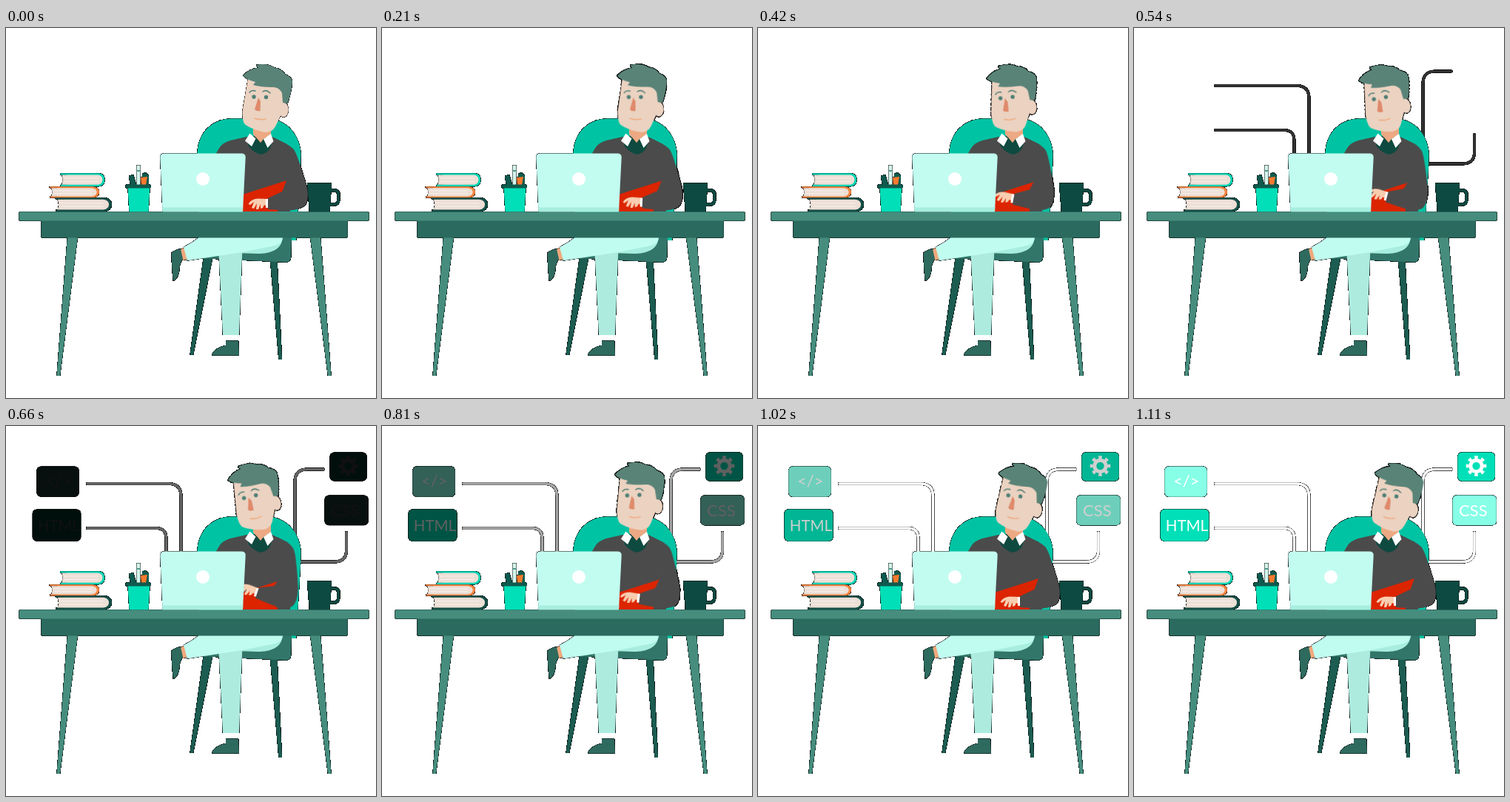
An HTML page that plays this animation: 500 by 500 pixels, repeating every 2.31 s.

```html
<!DOCTYPE html>
<html lang="en">
<head>
<meta charset="utf-8">
<title>Developer at a desk</title>
<style>
  html, body { margin: 0; width: 100%; height: 100%; overflow: hidden; background: #fff; }
  svg { display: block; width: 100vw; height: 100vh; }
  text { font-family: Lato, sans-serif; fill: #fff; }

  .head, .arm, .forearm, .wires, .labels { animation: 2310ms linear infinite; }
  .head { animation-name: head; transform-origin: 345px 146px; }
  .arm { animation-name: arm; transform-origin: 378px 165px; }
  .forearm { animation-name: forearm; transform-origin: 400px 236px; }
  .wires { animation-name: wires; fill: none; stroke: #fff; stroke-width: 3.6; stroke-linecap: round; }
  .labels { animation-name: labels; }

  @keyframes head {
    0%, 6.5% { transform: rotate(0deg); }
    14.29% { transform: rotate(-5deg); }
    23.38% { transform: rotate(-12deg); }
    28.57%, 29.87% { transform: rotate(-15deg); }
    35.06% { transform: rotate(-4deg); }
    40.26% { transform: translateY(1.2px) rotate(3.3deg); }
    45%, 100% { transform: translateY(1.2px) rotate(3.5deg); }
  }
  @keyframes arm {
    0%, 6.5% { transform: rotate(0deg); }
    14.29% { transform: rotate(5deg); }
    23.38% { transform: rotate(10.5deg); }
    28.57%, 29.87% { transform: rotate(13deg); }
    35.06% { transform: rotate(5deg); }
    40.26%, 100% { transform: rotate(0deg); }
  }
  @keyframes forearm {
    0%, 6.5% { transform: rotate(0deg); }
    14.29% { transform: rotate(2.3deg); }
    23.38% { transform: rotate(4.8deg); }
    28.57%, 29.87% { transform: rotate(6deg); }
    35.06% { transform: rotate(2.3deg); }
    40.26%, 100% { transform: rotate(0deg); }
  }
  @keyframes wires {
    0%, 18.18% { opacity: 0; }
    44.16%, 100% { opacity: 1; }
  }
  @keyframes labels {
    0%, 27.27% { opacity: 0; }
    48.05%, 100% { opacity: 1; }
  }
</style>
</head>
<body>
<svg viewBox="0 0 500 500">
  <defs>
    <!-- Puts black behind every partly transparent pixel: dark rims, fades from black -->
    <filter id="matte" filterUnits="userSpaceOnUse" x="0" y="0" width="500" height="500" color-interpolation-filters="sRGB">
      <feComponentTransfer in="SourceAlpha" result="black"><feFuncA type="linear" slope="30"/></feComponentTransfer>
      <feMerge><feMergeNode in="black"/><feMergeNode in="SourceGraphic"/></feMerge>
    </filter>
    <g id="book">
      <path fill="currentColor" d="M1 .3H53Q61 1 61 9T53 18.3H2Q0 17 2 15.500H10V2.500H1Q0 1.500 1 .3Z"/>
      <path fill="#eddfd6" d="M3 2.500H52Q58 3.500 58 9T52 15.800H3Q5 9 3 2.500Z"/>
      <path fill="none" stroke="#fff" stroke-width=".8" opacity=".7" d="M6 7H52M6 11.500H52"/>
    </g>
  </defs>

  <g filter="url(#matte)">
    <g class="wires">
      <path d="M110 78H220Q236.500 78 236.500 95V175M110 138H203Q216.500 138 216.500 152V175"/>
      <path d="M429 58.500H407Q390.500 58.500 390.500 75V160M460 144V168Q460 183.500 444 183.500H390"/>
    </g>

    <g class="labels">
      <rect x="41.300" y="54.400" width="57.500" height="41.400" rx="6" fill="#87ffe7"/>
      <rect x="35.600" y="112.400" width="65.800" height="43.300" rx="6" fill="#00e0b8"/>
      <rect x="437.400" y="35.500" width="50.400" height="39" rx="6" fill="#00e0b8"/>
      <rect x="430.400" y="93.500" width="59.400" height="40.800" rx="6" fill="#87ffe7"/>
      <text x="53" y="82" font-size="22">&lt;/&gt;</text>
      <text x="42.800" y="141.500" font-size="20.500">HTML</text>
      <text x="439" y="122" font-size="22">CSS</text>
      <g fill="none" stroke="#fff" stroke-width="5">
        <circle cx="462.500" cy="54" r="7.700"/>
        <circle cx="462.500" cy="54" r="11.300" pathLength="16" stroke-dasharray="1" stroke-dashoffset=".5"/>
      </g>
    </g>

    <g class="chair">
      <path fill="#00c3a4" d="M258.500 185V168C260 140 280 122.500 305 122.500H352C380 122.500 397 145 398.500 170L398 188L392 287H262Z"/>
      <path fill="#1c5c51" d="M267 309H279.500L253 442H248.500ZM357 314H366.500L373 448H368.500Z"/>
      <path fill="#32766a" d="M262 280H386L385 311Q384 317 377 316.500L262 311Z"/>
    </g>

    <g class="legs">
      <path fill="#aeebdf" d="M287 295L293 415H315L319.500 295Z"/>
      <path fill="#2f6a5f" d="M278 442.500Q280 433 297 429V422.500H314L315 442.500Z"/>
      <path fill="#f0a97c" d="M234 300L241 297L246 312L239 314Z"/>
      <path fill="#2f6a5f" d="M223.500 304Q229 299 236 298.500L239 312Q234 319 234 330Q232 339 226 342Q224 325 223.500 304Z"/>
      <path fill="#a8eee0" d="M300 282H374Q373 304 342 305L310 304Z"/>
      <path fill="#c0fcf0" d="M240 296Q252 290 262 282H374Q374 291 364 294L319 303L245 314.500Z"/>
    </g>

    <g class="body">
      <path fill="#4b4b4b" d="M325 147L303 152Q292 155 287 164L278 180V248H384L385 180L380 157L360 147Z"/>
      <path fill="#dc2400" d="M315 226.500L384 204.500L367 240V248H315Z"/>
      <path fill="#0e4a40" d="M325 150L328 160Q334 168 344 171Q354 169 357 162L361 150L350 146H335Z"/>
      <path fill="#eca983" d="M334 130H358V144L348 150L344 155L339 149L334 144Z"/>
      <path fill="#fff" d="M329.500 142.500L323 152.500L332 160L337.500 149.500ZM358 143L361.500 153L353.500 162L348 150Z"/>
      <g class="arm">
        <g class="forearm">
          <path fill="#f8cdb0" d="M354 231L340 230.500Q331 231 327.500 238L330 239L335 235L332 243L335 244L339 237L338 245H341L344 238V244L347 243L349 239L354 242Z"/>
          <path fill="#fff" d="M351 231H355V243H351Z"/>
          <path fill="#4b4b4b" d="M354 230L373 221L398 222Q408 236 400 242Q391 246.500 380 246.500L354 245Z"/>
        </g>
        <path fill="#4b4b4b" d="M364 153L379 157Q389 161 392.500 171Q399.500 189 406.500 214Q410.500 234 403 241Q394 246 384 246L373 222L379 206L364 178Z"/>
      </g>
    </g>

    <g class="head">
      <path fill="#ebd2c1" d="M327 68L319.500 112Q319 128 324 131Q335 138.500 350 141Q360 141 364 133L371 119L380 78L360 65Z"/>
      <ellipse cx="375" cy="110.500" rx="6.800" ry="10" fill="#ebd2c1"/>
      <path fill="#5a8378" d="M320 64Q329 55 341 53.500Q338 51.500 338 50Q353 47 363 53.500Q373 55 377 62Q386 66 387 72Q386 87 380.500 102L374 101L373 88Q369 79.500 360 80Q344 80 334 77L337 73Q325 70 320 64Z"/>
      <g fill="none" stroke="#4f7f75" stroke-width="1.500" stroke-linecap="round">
        <path d="M329 87Q332 83.500 337 85M347 86Q352 82.500 357 88"/>
      </g>
      <g fill="#4f7f75"><circle cx="335" cy="93" r="2.700"/><circle cx="351.500" cy="93.500" r="2.700"/></g>
      <path fill="#df8a6b" d="M341 94L336 110Q339 113 343.500 112L344 99Z"/>
      <path fill="none" stroke="#efae82" stroke-width="1.500" stroke-linecap="round" d="M336 122Q344 125 351 123"/>
    </g>

    <g class="table">
      <path fill="#468d7e" d="M83 282H97L73 470H68.500ZM411 282H425L439.500 470H435Z"/>
      <rect x="47.500" y="255" width="414.200" height="28.500" rx="2" fill="#2b6a5e"/>
      <rect x="17.500" y="248.300" width="473" height="12.300" rx="2" fill="#468d7e"/>
    </g>

    <g class="laptop">
      <path fill="#c2fcf0" d="M208.300 175Q208 169.500 214 169.500H318Q324 169.500 323.700 175L320 248.300H211.500Z"/>
      <path fill="#a8eee0" d="M211 242.500H320.300L320 248.300H211.500Z"/>
      <circle cx="266" cy="204" r="9" fill="#fff"/>
    </g>

    <g class="books">
      <use href="#book" color="#00d3b2" transform="translate(72.500 196)"/>
      <use href="#book" color="#f5843f" transform="translate(58 214) scale(1.115 .85)"/>
      <use href="#book" color="#134f47" transform="translate(66 229) scale(1.26 1.050)"/>
    </g>

    <g class="pencils">
      <path fill="#0e5a4e" d="M166 200L172 198L176 212H168ZM184 197L188 195L193 199V212H184Z"/>
      <path fill="#f57a2e" d="M182 202L191 201L189 212H183Z"/>
      <path fill="#d4f5ed" d="M176.500 185.500H181.500V212H176.500Z"/>
      <path fill="#58988b" d="M176.500 192H181.500V194H176.500Z"/>
      <path fill="#00dfb8" d="M164.500 214H194.500L192.500 248.300H166.500Z"/>
      <rect x="161.500" y="211.500" width="34.500" height="5" rx="2.500" fill="#0e5a4e"/>
    </g>

    <g class="mug">
      <path fill="#0d4a42" d="M407 209.500H440L437.500 248.300H410Z"/>
      <path fill="none" stroke="#0d4a42" stroke-width="4" d="M437 219.500H444Q449.300 219.500 449.300 225V232Q449.300 238.500 443 238.500H436"/>
    </g>
  </g>
</svg>
</body>
</html>
```
